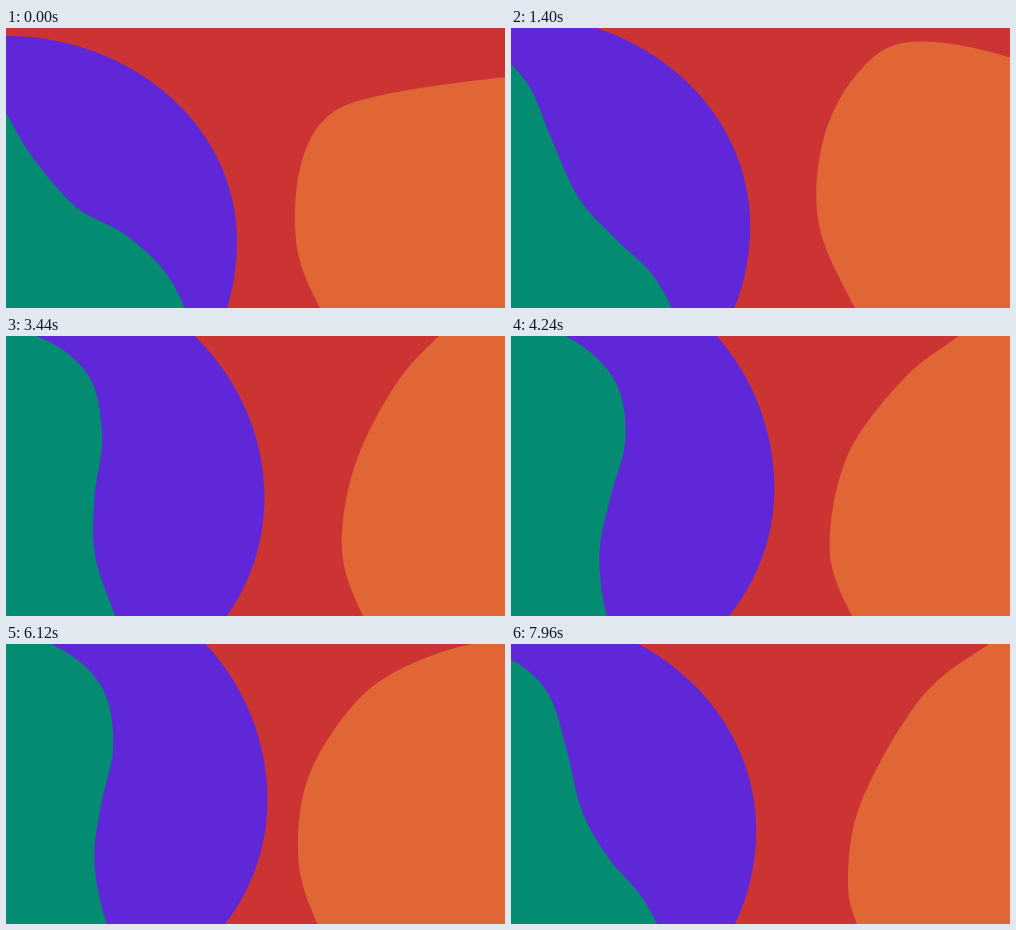
An HTML page that plays this animation: 499 by 280 pixels, repeating every 8 s.

```html
<!DOCTYPE html>
<html lang="en">
<head>
<meta charset="utf-8">
<title>Blobs</title>
<style>
  html, body { margin: 0; width: 100%; height: 100%; overflow: hidden; background: #cc3333; }
  svg { display: block; width: 499px; height: 280px; }
</style>
</head>
<body>
<svg viewBox="0 0 499 280">
  <path id="purple" fill="#5f27d7"/>
  <path id="green" fill="#038c71"/>
  <path id="orange" fill="#e06636"/>
</svg>
<script>
const LOOP = 8000;
const KAPPA = 0.5523;
const [purple, green, orange] = ['purple', 'green', 'orange'].map(id => document.getElementById(id));

// Each pose: key, then x,y pairs along the visible edge.
const greenPoses = [
  [0, [-40,30, -6,75, 25,127, 70,179, 120,207, 164,251, 186,310]],
  [0.5, [0,9, 45,44, 63,102, 73,164, 94,214, 126,257, 152,310]],
  [1, [62,0, 110,45, 121,103, 104,160, 89,215, 91,276, 108,320]],
];
const orangePoses = [
  [0, [510,48, 372,68, 318,92, 293,145, 291,220, 314,280]],
  [1400, [510,33, 400,14, 346,46, 312,113, 308,197, 344,280]],
  [2400, [490,-50, 405,-6, 364,40, 336,118, 341,210, 367,280]],
  [3440, [480,-35, 433,0, 388,51, 348,132, 336,215, 357,280]],
  [4200, [490,-30, 449,0, 393,44, 337,122, 320,215, 342,280]],
  [5080, [455,-30, 397,0, 345,40, 296,118, 289,205, 319,280]],
  [7000, [510,13, 430,30, 368,70, 318,149, 305,228, 314,280]],
  [7960, [520,-22, 478,0, 410,54, 351,156, 337,232, 346,280]],
];

const lerp = (a, b, u) => a + (b - a) * u;

// Smooth interpolation between poses with unevenly spaced keys.
function poseAt(poses, key) {
  const last = poses.length - 1;
  let i = 0;
  while (i < last - 1 && key > poses[i + 1][0]) i++;
  const [k0, from] = poses[i], [k1, to] = poses[i + 1];
  const span = k1 - k0;
  const u = Math.min(1, Math.max(0, (key - k0) / span));
  const slope = (j, n) =>
    (poses[j + 1][1][n] - poses[j - 1][1][n]) / (poses[j + 1][0] - poses[j - 1][0]);
  const values = from.map((a, n) => {
    const d = to[n] - a;
    let m0 = i > 0 ? slope(i, n) * span : null;
    let m1 = i + 1 < last ? slope(i + 1, n) * span : null;
    m0 ??= 2 * d - m1;
    m1 ??= 2 * d - m0;
    return a + u * m0 + u * u * (3 * d - 2 * m0 - m1) + u * u * u * (m0 + m1 - 2 * d);
  });
  const points = [];
  for (let n = 0; n < values.length; n += 2) points.push([values[n], values[n + 1]]);
  return points;
}

// Catmull-Rom curve through the points, as cubic segments.
function curve(points) {
  const beyond = (a, b, c) => a.map((v, n) => 3 * v - 3 * b[n] + c[n]);
  const p = [beyond(...points.slice(0, 3)), ...points, beyond(...points.slice(-3).reverse())];
  let d = `${p[1]}`;
  for (let i = 1; i < p.length - 2; i++) {
    const c1 = p[i].map((v, n) => v + (p[i + 1][n] - p[i - 1][n]) / 6);
    const c2 = p[i + 1].map((v, n) => v - (p[i + 2][n] - p[i][n]) / 6);
    d += `C${c1} ${c2} ${p[i + 1]}`;
  }
  return d;
}

function purplePath(p) {
  const x = 20 * p;
  const top = lerp(8, -90, p) + 15 * p * (1 - p);
  const bottom = lerp(443, 368, p);
  const right = lerp(231, 265, p), y = lerp(213, 150, p);
  const handle = lerp(x, right, KAPPA);
  return `M-100,${top}L${x},${top}` +
    `C${handle},${top} ${right},${lerp(y, top, KAPPA)} ${right},${y}` +
    `C${right},${lerp(y, bottom, KAPPA)} ${handle},${bottom} ${x},${bottom}L-100,${bottom}Z`;
}

function swayAt(t) {
  const rest = 0.0135;
  return ((1 - Math.cos(Math.PI * (t + 400) / 5400)) / 2 - rest) / (1 - rest);
}

function draw(t) {
  const sway = swayAt(t);
  purple.setAttribute('d', purplePath(sway));
  green.setAttribute('d', `M-100,400L-100,-60L${curve(poseAt(greenPoses, sway))}L186,400Z`);

  const edge = poseAt(orangePoses, t);
  const [x, y] = edge[edge.length - 1];
  edge.push([x + 27, y + 40]);
  orange.setAttribute('d', `M600,400L600,${edge[0][1]}L${curve(edge)}Z`);
}

const start = performance.now();
function tick() {
  draw((performance.now() - start) % LOOP);
  requestAnimationFrame(tick);
}
tick();
</script>
</body>
</html>
```
